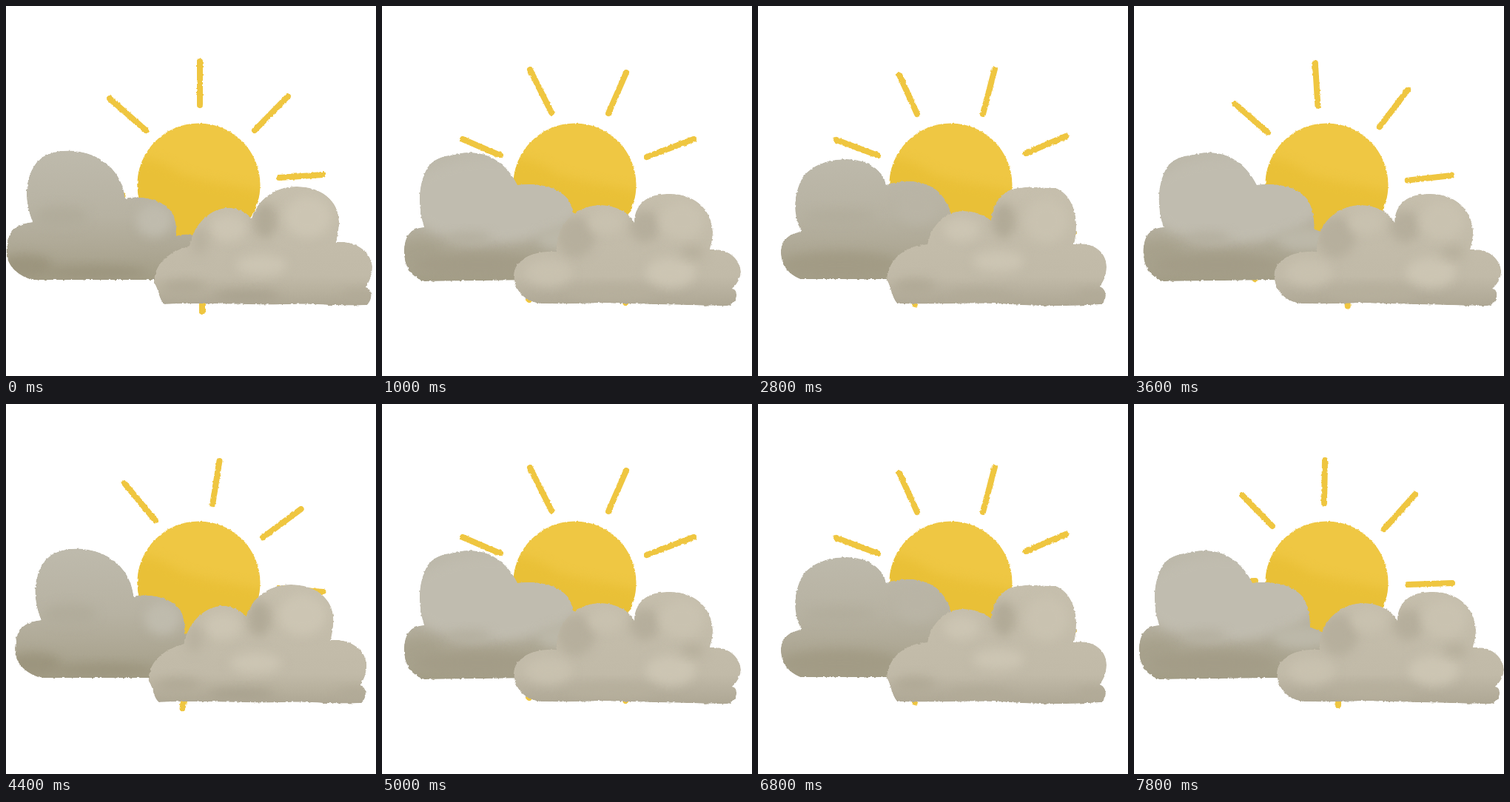
These frames come from a looping animation (500x500 px, 8010 ms). An HTML page:

```html
<!DOCTYPE html>
<html lang="en">
<head>
<meta charset="utf-8">
<title>Sun behind clouds</title>
<style>
  html, body { margin: 0; width: 100%; height: 100%; overflow: hidden; background: #fff; }
  svg { display: block; width: 100%; height: 100%; }
  .rays { fill: none; stroke: #efc640; stroke-width: 8; stroke-linecap: round; }
</style>
</head>
<body>
<svg viewBox="0 0 500 500">
  <defs>
    <filter id="rough" filterUnits="userSpaceOnUse" x="-80" y="0" width="660" height="500" color-interpolation-filters="sRGB">
      <feTurbulence type="fractalNoise" baseFrequency=".25" numOctaves="2" seed="4"/>
      <feDisplacementMap in="SourceGraphic" scale="3" xChannelSelector="R" yChannelSelector="G"/>
    </filter>
    <filter id="soft" x="-60%" y="-60%" width="220%" height="220%" color-interpolation-filters="sRGB">
      <feGaussianBlur stdDeviation="7"/>
    </filter>
    <linearGradient id="backFill" gradientUnits="userSpaceOnUse" x1="0" y1="196" x2="0" y2="372">
      <stop offset="0" stop-color="#bebaac"/>
      <stop offset=".5" stop-color="#b7b2a2"/>
      <stop offset=".75" stop-color="#aea895"/>
      <stop offset="1" stop-color="#a39d86"/>
    </linearGradient>
    <linearGradient id="frontFill" gradientUnits="userSpaceOnUse" x1="0" y1="245" x2="0" y2="405">
      <stop offset="0" stop-color="#c6bfad"/>
      <stop offset=".75" stop-color="#c1baa8"/>
      <stop offset="1" stop-color="#aea794"/>
    </linearGradient>
    <clipPath id="disc"><ellipse cx="260.5" cy="241.5" rx="83" ry="83"/></clipPath>
  </defs>
  <g filter="url(#rough)">
    <path class="rays" id="rays"/>
    <g clip-path="url(#disc)">
      <path fill="#efc743" d="M170 150H350V330H170Z"/>
      <path fill="#e9c037" filter="url(#soft)" d="M165 203C200 205 215 212 235 226C265 238 300 240 352 252V340H165Z"/>
    </g>
  </g>
  <g id="clouds"></g>
</svg>
<script>
const CX = 263, CY = 244;
const STEP = 200, LOOP = 8010, CYCLE = 20, HOLD = 5;
const LIGHT = '#ccc5b3', SHADE = '#b1aa97', PALE = '#bfbbad', DARK = '#9c957e';

// u: drift step at which the outlines sit where they are drawn.
// Patches: x, y, rx, ry, colour.
const drawings = [
  {
    u: 0,
    back: {
      d: 'M35 370C10 362-2 345 1 325C3 300 18 294 36 292C24 262 24 230 45 207C65 192 95 194 112 200C140 209 158 232 161 260C185 255 215 263 225 280C230 290 231 302 229 311C245 306 262 308 275 325L285 370Z',
      patches: [[25, 352, 38, 16, DARK], [120, 360, 70, 9, DARK], [200, 290, 24, 22, PALE], [75, 285, 36, 14, '#b1ac9b']]
    },
    front: {
      d: 'M214 403C206 396 207 384 200 374C200 352 214 334 248 324C254 292 280 270 305 273C318 275 326 280 332 287C340 262 362 244 392 244C425 244 450 262 450 292C450 302 448 312 446 319C472 316 494 332 495 352C495 366 490 374 486 380C495 382 496 396 488 404C440 406 420 402 390 403C340 405 280 400 214 403Z',
      patches: [[350, 290, 16, 24, SHADE], [408, 285, 32, 28, LIGHT], [300, 300, 25, 18, LIGHT], [262, 318, 12, 18, '#b9b2a0'], [345, 350, 35, 14, LIGHT], [240, 380, 30, 10, SHADE], [325, 392, 45, 8, '#a9a28f'], [480, 392, 26, 8, SHADE]]
    }
  },
  {
    u: 5,
    back: {
      d: 'M57 372C38 366 29 350 30 328C32 306 42 300 57 299C48 270 49 242 61 219C70 205 86 202 98 201C115 195 140 198 155 209C168 218 176 228 183 242C210 238 240 245 252 262C259 274 261 288 261 302C272 305 280 309 285 316L300 369Z',
      patches: [[150, 262, 120, 58, '#c0bcaf'], [50, 338, 32, 22, '#a7a18c'], [130, 350, 85, 16, '#a39c87'], [118, 314, 30, 9, '#b5b0a0'], [250, 315, 40, 16, '#bcb8a9']]
    },
    front: {
      d: 'M215 402C194 400 179 386 178 364C179 342 204 330 236 332C234 300 258 270 294 269C318 269 334 280 341 293C341 268 358 254 385 254C423 252 446 276 447 305C447 314 445 322 443 329C467 326 485 342 485 360C484 370 478 378 473 382C481 382 481 396 474 402C468 408 450 404 440 405C390 403 340 403 300 401C270 402 245 403 215 402Z',
      patches: [[262, 312, 26, 28, '#b6af9d'], [355, 298, 20, 22, '#b5ae9c'], [302, 292, 24, 16, '#c8c1af'], [405, 290, 30, 26, '#c9c2b0'], [225, 360, 32, 18, '#c8c1af'], [390, 360, 34, 20, LIGHT], [420, 333, 16, 8, '#b6af9c'], [310, 388, 60, 10, '#b6af9c']]
    }
  },
  {
    u: 6,
    back: {
      d: 'M57 369C40 362 30 348 31 330C33 313 45 307 59 305C48 285 46 258 60 232C72 215 95 207 120 207C148 207 170 222 173 242C200 232 235 236 250 258C258 268 262 280 262 290L280 369Z',
      patches: [[110, 350, 80, 18, '#a29b85'], [215, 270, 28, 24, '#b9b4a5'], [110, 285, 50, 10, '#b2ad9c']]
    },
    front: {
      d: 'M188 402C180 392 180 380 174 370C176 340 200 324 229 322C234 296 254 276 278 277C298 278 308 284 315 290C316 268 330 248 352 246C370 243 388 246 402 246C420 252 430 274 430 295C430 306 429 314 427 322C452 318 471 332 471 352C471 366 466 373 462 379C472 383 472 397 464 403C420 406 380 406 340 403C290 400 240 404 188 402Z',
      patches: [[332, 290, 16, 24, SHADE], [390, 290, 30, 30, '#c9c2b0'], [275, 302, 24, 16, LIGHT], [325, 345, 35, 14, LIGHT], [212, 380, 28, 12, SHADE], [300, 392, 45, 8, SHADE], [455, 391, 26, 8, SHADE]]
    }
  }
];

// Four rays per hold, drawn at step n; the other four are mirrored through mid.
const raySets = [
  { n: 0, mid: [263.5, 244], rays: [[140, 125, 189, 168], [262, 75, 262, 134], [381, 122, 336, 168], [428, 228, 369, 232]] },
  { n: 5, mid: [264.5, 243.5], rays: [[109, 180, 160, 202], [200, 86, 229, 144], [330, 90, 306, 145], [421, 180, 358, 204]] },
  { n: 14, mid: [266, 244], rays: [[106, 181, 162, 202], [191, 93, 215, 146], [320, 85, 304, 146], [416, 176, 362, 199]] },
  { n: 19, mid: [267, 241.5], rays: [[146, 123, 187, 165], [258, 76, 257, 134], [380, 122, 338, 169], [430, 242, 370, 244]] }
];

const rayPath = ({ mid: [mx, my], rays }) => rays.map(([x, y, p, q]) =>
  `M${x} ${y}L${p} ${q}M${2 * mx - x} ${2 * my - y}L${2 * mx - p} ${2 * my - q}`).join('');

const ellipse = ([x, y, rx, ry, fill]) =>
  `<ellipse cx="${x}" cy="${y}" rx="${rx}" ry="${ry}" fill="${fill}" filter="url(#soft)"/>`;

const cloud = (kind, i) => {
  const { d, patches } = drawings[i][kind];
  return `<clipPath id="${kind}${i}"><path d="${d}"/></clipPath>
    <g class="${kind}"><g filter="url(#rough)"><g clip-path="url(#${kind}${i})">
      <path d="${d}" fill="url(#${kind}Fill)"/>${patches.map(ellipse).join('')}
    </g></g></g>`;
};

const clouds = document.getElementById('clouds');
clouds.innerHTML = drawings.map((_, i) => `<g>${cloud('back', i)}${cloud('front', i)}</g>`).join('');
const layers = [...clouds.children];
const rays = document.getElementById('rays');

function draw(n) {
  const hold = Math.floor(n / HOLD);
  const shown = [0, 1, 2, 1][hold];
  const u = Math.min(n, CYCLE - n) - drawings[shown].u;
  layers.forEach((g, i) => g.setAttribute('display', i === shown ? 'inline' : 'none'));
  const move = (kind, dx) =>
    layers[shown].querySelector('.' + kind).setAttribute('transform', `translate(${dx} 0)`);
  move('back', 5.75 * u);
  move('front', -3.75 * u);
  const set = raySets[hold];
  rays.setAttribute('d', rayPath(set));
  rays.setAttribute('transform', `rotate(${4.5 * (n - set.n)} ${CX} ${CY})`);
}

let last = -1;
function tick() {
  const n = Math.min(39, Math.floor(performance.now() % LOOP / STEP)) % CYCLE;
  if (n !== last) draw(last = n);
  requestAnimationFrame(tick);
}
tick();
</script>
</body>
</html>
```
